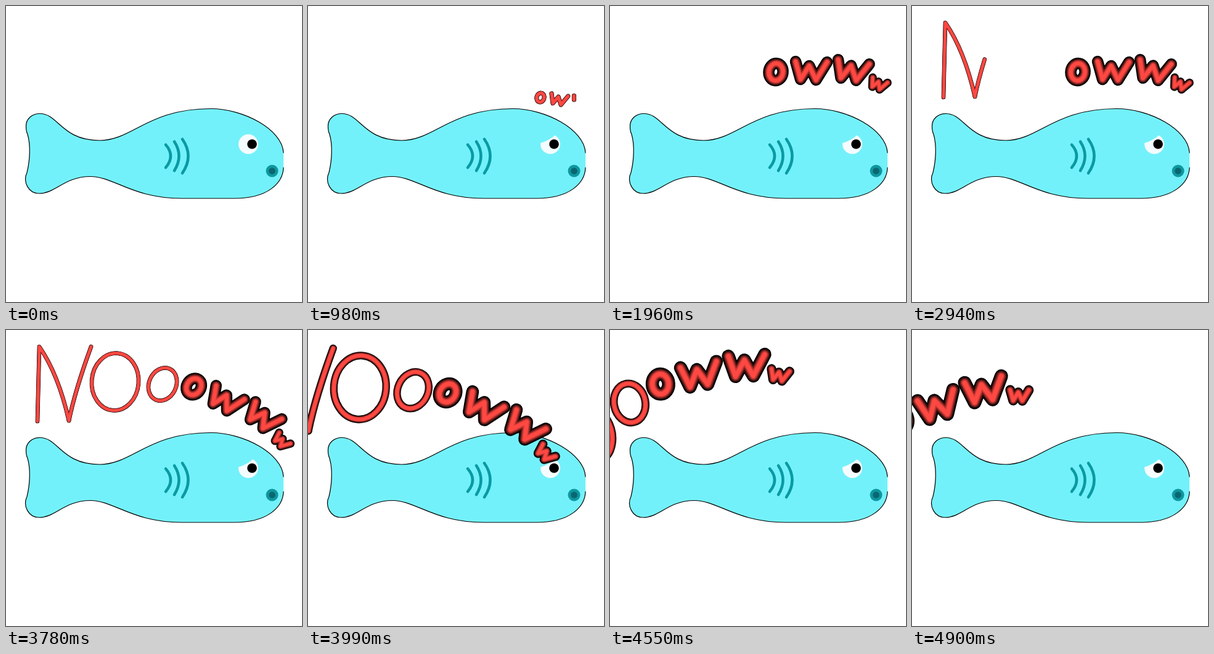
Recreate the animation shown at these times as an HTML page. Size 480 px wide and 480 px high, loop 4970 ms.

```html
<!DOCTYPE html>
<html lang="en">
<head>
<meta charset="utf-8">
<title>Fish says ow</title>
<style>
  html, body { margin: 0; width: 100%; height: 100%; overflow: hidden; background: #fff; }
  svg { display: block; width: 100vw; height: 100vh; overflow: hidden; }
  path { stroke-linecap: round; stroke-linejoin: round; }
  .line { fill: none; }
</style>
</head>
<body>
<svg viewBox="0 0 480 480">
  <path fill="#73f1fa" stroke="#000" stroke-width="1.2" d="M450 262
    C449 287 425 312 370 312 L285 312
    C205 312 175 276.5 137 276.5 C95 276.5 80 304 54 304
    C36 304 27 285 34 270 C39 250 40 225 35 208 C33 204 32.5 200 32.5 195
    C32.5 183 42 174.5 55 174.5 C85 174.5 90 218 152 218
    C205 218 230 166.5 332 166.5 C385 166.5 448 200 450 238"/>
  <g class="line" stroke="#0a9aa3" stroke-width="4.6">
    <path d="M259 225Q275 243 259 262M273 220Q288 243 273 267M286 216Q305 243 286 271"/>
  </g>
  <circle cx="393" cy="224" r="16" fill="#f5fcff"/>
  <path id="lid" class="line" stroke="#73f1fa" stroke-width="12" pathLength="1" d="M374 217Q388 213 399 203"/>
  <circle cx="399" cy="224" r="7.8"/>
  <circle cx="431.5" cy="267.5" r="10" fill="#0f979f"/>
  <circle cx="431.5" cy="267.5" r="5.3" fill="#0a6670"/>
  <g id="shout"><g id="cry"></g></g>
</svg>
<script>
const LOOP = 4970, STEP = 70;
const INK = ['#000', '#330d0c', '#7c2320', '#c83934', '#ff4842'];
const [lid, shout, cry] = ['lid', 'shout', 'cry'].map(id => document.getElementById(id));

const ramp = (t, from, to) => Math.min(1, Math.max(0, (t - from) / (to - from)));
const mix = (a, b, k) => a + (b - a) * k;

// Anticlockwise ring from its top end
function ring(cx, cy, rx, ry, tilt) {
  const a = tilt * Math.PI / 180, dx = ry * Math.sin(a), dy = -ry * Math.cos(a);
  const arc = s => `A${rx} ${ry} ${tilt} 0 0 ${cx + s * dx} ${cy + s * dy}`;
  return `M${cx + dx} ${cy + dy}${arc(-1)}${arc(1)}`;
}

// Letter w from its first tip
function zigzag(x, y, size, tilt) {
  const m = new DOMMatrix().translate(x, y).rotate(tilt).scale(size);
  const tips = [[0, 0], [8, 29], [22, -22 + 29], [33, 30], [51, 1]];
  return 'M' + tips.map(([px, py]) => {
    const p = m.transformPoint({ x: px, y: py });
    return `${p.x} ${p.y}`;
  }).join('L');
}

// Inks lie in layers, so joining strokes share one outline
function lettering(parent, strokes) {
  return INK.flatMap((color, layer) => strokes.map(({ d, from, to, weight = 1 }) => {
    const el = document.createElementNS('http://www.w3.org/2000/svg', 'path');
    el.setAttribute('d', d);
    el.setAttribute('class', 'line');
    el.setAttribute('stroke', color);
    el.setAttribute('pathLength', 1);
    parent.appendChild(el);
    return { el, depth: layer / (INK.length - 1), from, to, weight };
  }));
}

const cryInk = lettering(cry, [
  { d: ring(0, 1, 11.5, 14, 8), from: 350, to: 630 },
  { d: zigzag(32, -16, 1, 0), from: 630, to: 910 },
  { d: zigzag(101, -19, 1, 7), from: 955, to: 1190 },
  { d: zigzag(157, 10, .5, 18), from: 1190, to: 1400, weight: .72 }
]);
const shoutInk = lettering(shout, [
  { d: 'M51 148L54 27Q85 72 102 147', from: 1960, to: 2730 },
  { d: 'M102 147Q112 98 138 27', from: 2800, to: 3080 },
  { d: ring(177, 84, 38, 46.5, 5), from: 3080, to: 3500 },
  { d: ring(254, 88, 22, 27.5, 25), from: 3500, to: 3780 }
]);

function reveal(el, p) {
  el.style.display = p > 0 ? '' : 'none';
  el.style.strokeDasharray = p < 1 ? `${p} 2` : 'none';
}

function paint(ink, outer, inner, t) {
  for (const { el, depth, from, to, weight } of ink) {
    reveal(el, ramp(t, from, to));
    el.style.strokeWidth = mix(outer, inner, depth) * weight;
  }
}

function place(el, x, y, size, angle, pivot = '') {
  el.setAttribute('transform', `translate(${x} ${y}) rotate(${angle}) scale(${size}) ${pivot}`);
}

function draw(now) {
  const t = Math.floor((now % LOOP) / STEP) * STEP;

  const grow = ramp(t, 1540, 1960), lean = ramp(t, 3430, 3570);
  place(cry, 377 - 108 * grow + 36 * lean, 148 - 42 * grow - 15 * lean,
    mix(.53, 1, grow), 8 - 8 * grow + 25 * lean);
  paint(cryInk, mix(13.5, 18.5, grow), mix(9, 6, grow), t);

  // Slide left while swelling, then swing over and down
  const slide = ramp(t, 3780, 3990), swing = ramp(t, 3990, 4900) ** 1.1;
  place(shout, 305 - 78 * slide - 248 * swing,
    91 + 10 * slide - 122 * swing + 166 * swing ** 2,
    1 + .115 * slide + .07 * swing, -43.5 * swing * (2 - swing), 'translate(-305 -91)');
  paint(shoutInk, mix(6.6, 11, slide), mix(4.3, 4.8, slide), t);

  reveal(lid, ramp(t, 0, 350));
}

let start;
function tick(now) {
  start ??= now;
  draw(now - start);
  requestAnimationFrame(tick);
}
draw(0);
requestAnimationFrame(tick);
</script>
</body>
</html>
```
